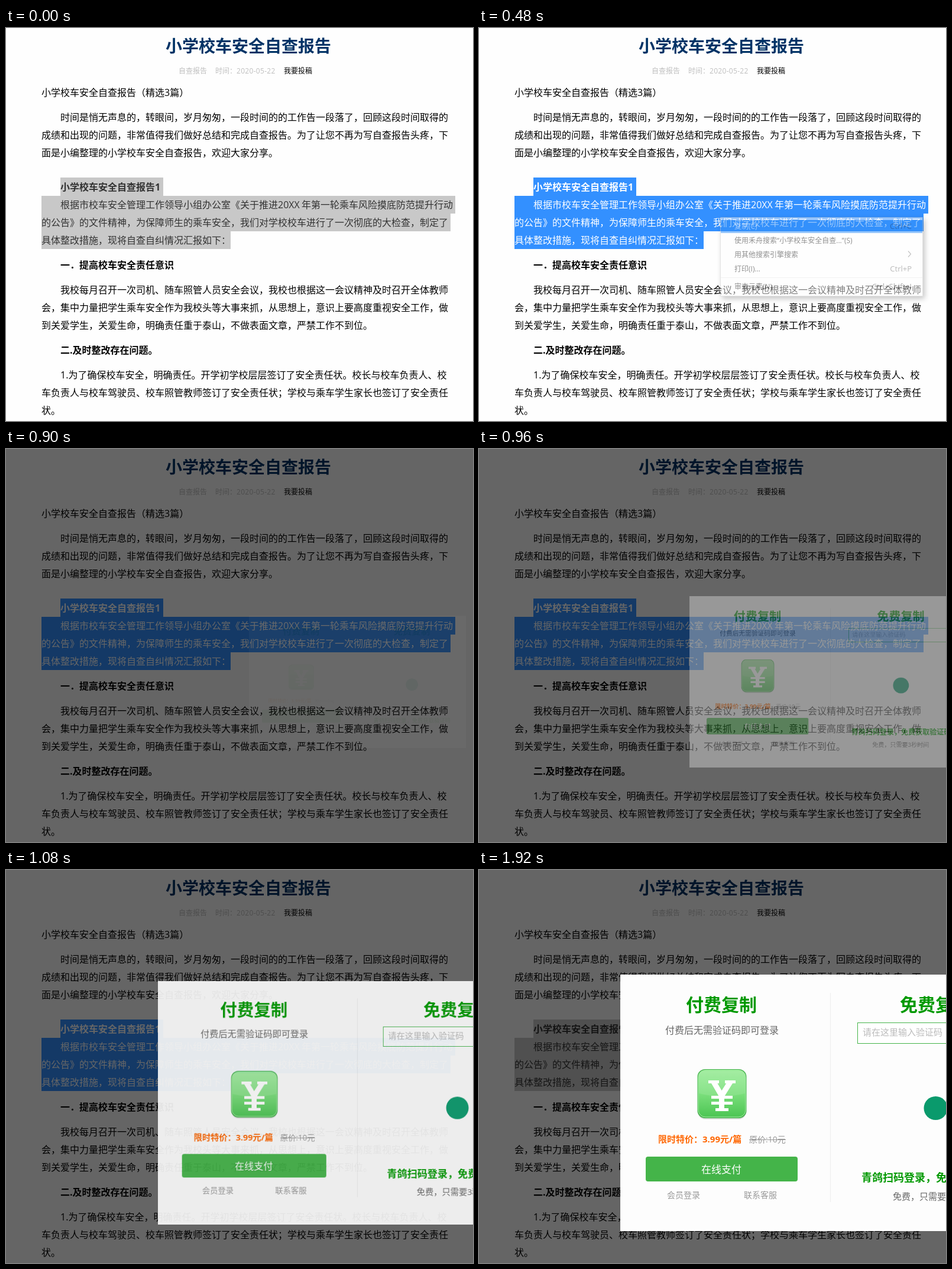
Write an HTML page that moves like this. It is 790x665 px and loops after 2040 ms.

```html
<!DOCTYPE html>
<html lang="zh-CN">
<head>
<meta charset="utf-8">
<title>小学校车安全自查报告</title>
<style>
  html, body { margin: 0; width: 100%; height: 100%; overflow: hidden; background: #fefefe; }
  svg { display: block; width: 790px; height: 665px; }
  text {
    font-family: "Open Sans", "Noto Sans CJK SC", "Noto Sans CJK", sans-serif;
    font-size: 16px; text-spacing-trim: space-all; font-kerning: none; white-space: pre;
  }
  .b { font-weight: 700; }
  .meta { font-size: 12px; fill: #bfbfbf; }
  #menu text { font-size: 12px; fill: #222; }
  #menu .key { font-size: 13px; fill: #777; text-anchor: end; }
  #menu { filter: drop-shadow(3px 4px 5px rgba(0, 0, 0, .45)); }
  #modal { transform-origin: 594.5px 394px; }
  .head { font-size: 30px; font-weight: 700; fill: #090; }
  .link { font-size: 14px; fill: #999; }
</style>
</head>
<body>
<svg viewBox="0 0 790 665" xmlns="http://www.w3.org/2000/svg">
  <defs>
    <linearGradient id="leaf" x1="0" y1="0" x2="0" y2="1">
      <stop offset="0" stop-color="#9aeb98"/>
      <stop offset=".5" stop-color="#7bdf7c"/>
      <stop offset="1" stop-color="#4cc553"/>
    </linearGradient>
  </defs>
  <rect width="790" height="665" fill="#fefefe"/>

  <text class="b" x="270" y="41" style="font-size:28px" fill="#036">小学校车安全自查报告</text>
  <text class="meta" x="292" y="77">自查报告</text>
  <text class="meta" x="354" y="77">时间：</text>
  <text class="meta" x="390" y="77" letter-spacing=".3">2020-05-22</text>
  <text class="meta" x="470" y="77" style="fill:#000">我要投稿</text>

  <g id="page"></g>
  <path id="mark" d="M92 253H266V284H760V314H752V344H380V374H60V284H92Z" fill="#c8c8c8"/>
  <g id="picked" fill="#323232"></g>

  <g id="menu" opacity="0">
    <rect x="408.5" y="320.5" width="342" height="133" fill="#fff" stroke="#ccc"/>
    <rect x="409" y="325" width="341" height="22" fill="#3390f8"/>
    <path d="M409 422.5H750" stroke="#e6e6e6"/>
    <path d="M726 377.5L730.5 382.5L726 387.5" fill="none" stroke="#888" stroke-width="1.2"/>
    <text x="432" y="340" style="fill:#fff">复制(C)</text>
    <text x="432" y="364">使用禾舟搜索“小学校车安全自查...”(S)</text>
    <text x="432" y="388">用其他搜索引擎搜索</text>
    <text x="432" y="412">打印(I)...</text>
    <text x="432" y="442">审查元素(N)</text>
    <text class="key" x="732" y="340" style="fill:#24446e">Ctrl+C</text>
    <text class="key" x="732" y="412">Ctrl+P</text>
    <text class="key" x="732" y="442" style="fill:#555">Ctrl+Shift+I</text>
  </g>

  <rect id="shade" width="790" height="665" fill="#000" fill-opacity=".6" opacity="0"/>

  <g id="modal" opacity="0">
    <rect x="239" y="177" width="711" height="434" fill="#fdfdfd"/>
    <path d="M594.5 208V562" stroke="#eee"/>

    <text class="head" x="350" y="239">付费复制</text>
    <text x="315" y="277" fill="#666">付费后无需验证码即可登录</text>

    <rect x="370" y="339" width="82" height="83" rx="13" fill="#000" fill-opacity=".12"/>
    <rect x="369.5" y="337" width="83" height="83" rx="13" fill="#45b14c"/>
    <rect x="371" y="338.5" width="80" height="79.5" rx="12" fill="url(#leaf)" stroke="#a5eea4"/>
    <path d="M372 378Q411 388 450 378V350Q450 340 439 340H383Q372 340 372 350Z" fill="#fff" fill-opacity=".1"/>
    <g stroke="#fff" fill="none">
      <path d="M396.5 358L410.5 382L425.5 358M410.5 380V406" stroke-width="9"/>
      <path d="M388 358.5H406M416 358.5H434M400 405.5H422" stroke-width="5"/>
      <path d="M393 384.5H429M393 394.5H429" stroke-width="5"/>
    </g>

    <text class="b" x="303" y="461" style="font-size:15px" fill="#f60">限时特价：3.99元/篇</text>
    <text class="link" x="457" y="461">原价:10元</text>
    <path d="M457 456.5H519" stroke="#999"/>
    <rect x="282" y="485" width="257" height="42" rx="4" fill="#44b449"/>
    <text x="376" y="513" style="font-size:17px" fill="#fff">在线支付</text>
    <text class="link" x="318" y="555">会员登录</text>
    <text class="link" x="448" y="555">联系客服</text>

    <text class="head" x="712" y="239">免费复制</text>
    <rect x="640.5" y="258.5" width="264" height="35" fill="#fff" stroke="#44b449"/>
    <text x="649" y="280" style="font-size:15px" fill="#bbb">请在这里输入验证码</text>
    <circle cx="772.5" cy="403" r="20" fill="#0a9a6c"/>
    <text class="b" x="647" y="527" style="font-size:18px" fill="#090">青鸽扫码登录，免费获取验证码</text>
    <text x="700" y="558" style="font-size:15px" fill="#666">免费，只需要3秒时间</text>
  </g>
</svg>
<script>
  const LOOP = 2040;
  const $ = id => document.getElementById(id);

  // [x, baseline, text, bold]
  const page = [
    [60, 115, '小学校车安全自查报告（精选3篇）'],
    [92, 157, '时间是悄无声息的，转眼间，岁月匆匆，一段时间的的工作告一段落了，回顾这段时间取得的'],
    [60, 187, '成绩和出现的问题，非常值得我们做好总结和完成自查报告。为了让您不再为写自查报告头疼，下'],
    [60, 217, '面是小编整理的小学校车安全自查报告，欢迎大家分享。'],
    [92, 407, '一．提高校车安全责任意识', true],
    [92, 449, '我校每月召开一次司机、随车照管人员安全会议，我校也根据这一会议精神及时召开全体教师'],
    [60, 479, '会，集中力量把学生乘车安全作为我校头等大事来抓，从思想上，意识上要高度重视安全工作，做'],
    [60, 509, '到关爱学生，关爱生命，明确责任重于泰山，不做表面文章，严禁工作不到位。'],
    [92, 551, '二.及时整改存在问题。', true],
    [92, 593, '1.为了确保校车安全，明确责任。开学初学校层层签订了安全责任状。校长与校车负责人、校'],
    [60, 623, '车负责人与校车驾驶员、校车照管教师签订了安全责任状；学校与乘车学生家长也签订了安全责任'],
    [60, 653, '状。']
  ];
  const picked = [
    [92, 275, '小学校车安全自查报告1', true],
    [92, 305, '根据市校车安全管理工作领导小组办公室《关于推进'],
    [460, 305, '20XX'],
    [500, 305, '年第一轮乘车风险摸底防范提升行动'],
    [60, 335, '的公告》的文件精神，为保障师生的乘车安全，我们对学校校车进行了一次彻底的大检查，制定了'],
    [60, 365, '具体整改措施，现将自查自纠情况汇报如下：']
  ];

  function write(group, lines) {
    for (const [x, y, str, bold] of lines) {
      const el = document.createElementNS('http://www.w3.org/2000/svg', 'text');
      el.setAttribute('x', x);
      el.setAttribute('y', y);
      if (bold) el.setAttribute('class', 'b');
      el.textContent = str;
      group.append(el);
    }
  }
  write($('page'), page);
  write($('picked'), picked);

  // Each row is [time, value]; a value holds until the next row.
  function hold(id, prop, rows) {
    const last = rows[rows.length - 1][1];
    const keys = [...rows, [LOOP, last]].map(([t, v]) =>
      ({ offset: t / LOOP, [prop]: v, easing: 'steps(1, end)' }));
    return $(id).animate(keys, { duration: LOOP, iterations: Infinity });
  }

  const pop = [[900, .035], [960, .34], [1020, .705], [1080, .9], [1140, .98], [1200, 1]];
  const runs = [
    hold('mark', 'fill', [[0, '#c8c8c8'], [420, '#3390ff'], [1920, '#c8c8c8']]),
    hold('picked', 'fill', [[0, '#323232'], [420, '#ffffff'], [1920, '#323232']]),
    hold('menu', 'opacity', [[0, 0], [480, .5], [600, .97], [900, 0]]),
    hold('shade', 'opacity', [[0, 0], [900, 1]]),
    hold('modal', 'opacity', [[0, 0], ...pop]),
    hold('modal', 'transform', [[0, 'scale(.5)'], ...pop.map(([t, p]) => [t, `scale(${.5 + p / 2})`])])
  ];
  for (const run of runs) run.startTime = document.timeline.currentTime || 0;
</script>
</body>
</html>
```
